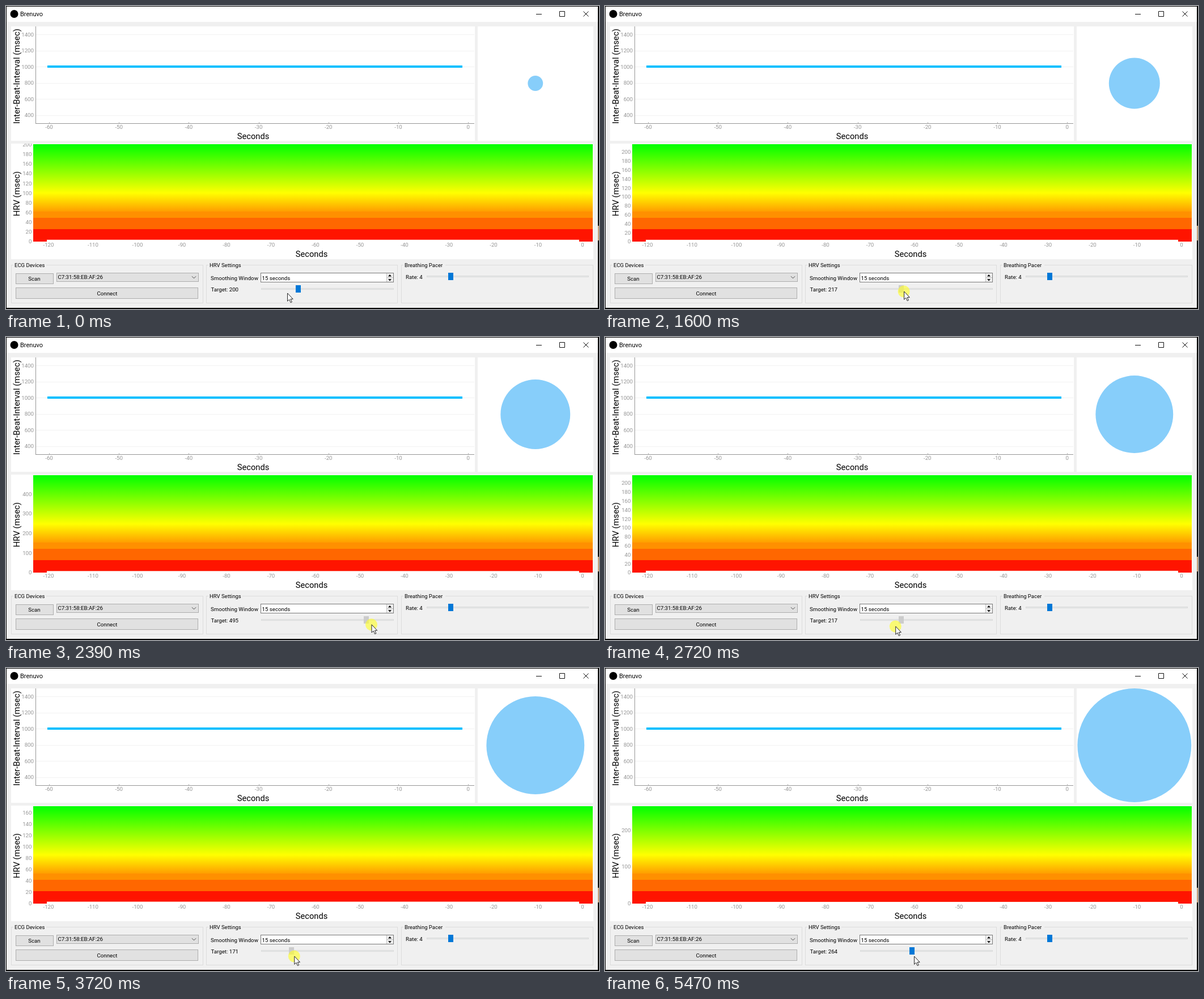
These frames come from a looping animation (1046x535 px, 5500 ms). An HTML page:

```html
<!DOCTYPE html>
<html lang="en">
<head>
<meta charset="utf-8">
<title>Heart rate monitor</title>
<style>
  html, body { margin: 0; width: 100%; height: 100%; overflow: hidden; background: #000; }
  svg { display: block; width: 1046px; height: 535px; font-family: Roboto, "Noto Sans", sans-serif; font-size: 9.7px; }
  rect, line { shape-rendering: crispEdges; }
</style>
</head>
<body>
<svg id="stage" viewBox="0 0 1046 535" xmlns="http://www.w3.org/2000/svg">
  <defs>
    <linearGradient id="zones" x1="0" y1="1" x2="0" y2="0">
      <stop offset="0" stop-color="#ff1400"/><stop offset=".125" stop-color="#ff1400"/>
      <stop offset=".125" stop-color="#ff6700"/><stop offset=".245" stop-color="#ff6700"/>
      <stop offset=".245" stop-color="#ff9000"/><stop offset=".308" stop-color="#ff9000"/>
      <stop offset=".308" stop-color="#ff9d00"/><stop offset=".5" stop-color="#ff0"/>
      <stop offset="1" stop-color="#0f0"/>
    </linearGradient>
    <clipPath id="hrvClip"><rect x="9" y="243" width="1027" height="204"/></clipPath>
    <clipPath id="plotClip"><rect x="48" y="244" width="987" height="172"/></clipPath>
    <clipPath id="pacerClip"><rect x="832" y="36" width="204" height="202"/></clipPath>
  </defs>
</svg>
<script>
const LOOP = 5500, PRESS = 1340, RELEASE = 5340, HOVER = 640;
const GREY = '#969696', BLUE = '#0078d7', INK = '#000';

// [time, pacer radius]
const RADIUS = [[0, 13.4], [560, 24.4], [820, 29], [1180, 36.3], [1990, 53], [2720, 68.4],
  [3140, 77.8], [3550, 84.2], [4310, 94], [4600, 96.8], [5270, 100.2], [5500, 100.5]];
// [time, HRV target]
const TARGET = [[1340, 200], [1600, 217], [1850, 264], [1990, 318], [2180, 434], [2330, 507],
  [2430, 488], [2600, 328], [2720, 218], [2850, 124], [2970, 70], [3060, 50], [3220, 50],
  [3500, 109], [3800, 193], [4100, 226], [4310, 234], [4600, 239], [4730, 239], [5000, 252], [5270, 264]];
// [time, x, y]
const POINTER = [[0, 496, 507], [240, 502, 515], [480, 513, 509], [640, 518, 505], [820, 519.5, 504],
  [1340, 519.5, 504], [1600, 527, 504], [1850, 553, 504], [1990, 576, 505], [2180, 625, 505],
  [2310, 649, 506], [2400, 644, 508], [2560, 572, 512], [2720, 512.5, 511], [2850, 477, 510],
  [2970, 459, 510], [3140, 452.5, 510], [3220, 455, 509], [3500, 484, 509], [3800, 517, 509],
  [4100, 530, 509], [4310, 533, 509], [4700, 534, 509], [5270, 545, 509]];

const stage = document.getElementById('stage');

function add(tag, attrs, parent = stage) {
  const el = document.createElementNS('http://www.w3.org/2000/svg', tag);
  for (const k in attrs) el.setAttribute(k, attrs[k]);
  parent.appendChild(el);
  return el;
}
const box = (x, y, width, height, fill, parent) => add('rect', { x, y, width, height, fill }, parent);
const framed = (x, y, width, height, fill, stroke) =>
  add('rect', { x: x + .5, y: y + .5, width: width - 1, height: height - 1, fill, stroke });
const path = (d, stroke, fill = 'none', width = 1) => add('path', { d, stroke, fill, 'stroke-width': width });

// Text whose middle line lies at y.
function label(str, x, y, { anchor = 'start', fill = INK, size = 9.7, parent = stage, turn } = {}) {
  const attrs = { x, y: y + size * .36, fill, 'text-anchor': anchor, 'font-size': size };
  if (turn) attrs.transform = `rotate(-90 ${x} ${y})`;
  const el = add('text', attrs, parent);
  el.textContent = str;
  return el;
}

function at(table, t) {
  if (t <= table[0][0]) return table[0].slice(1);
  for (let i = 1; i < table.length; i++) {
    const a = table[i - 1], b = table[i];
    if (t <= b[0]) {
      const k = (t - a[0]) / (b[0] - a[0]);
      return a.slice(1).map((v, j) => v + (b[j + 1] - v) * k);
    }
  }
  return table[table.length - 1].slice(1);
}

// Window and title bar
box(1, 1, 1043, 532, '#f0f0f0');
box(1, 1, 1043, 27, '#fff');
add('circle', { cx: 14.5, cy: 14, r: 7, fill: INK });
label('Brenuvo', 25, 14.5, { size: 11 });
path('M935 14.5H945M976.5 9.5h9v9h-9zM1018.5 9.5l9 9m0-9l-9 9', '#111');
box(1044, 388, 2, 26, '#c9a27c');

// Inter-beat-interval plot
box(9, 36, 818, 202, '#fff');
for (let v = 400; v <= 1400; v += 200) {
  const y = 107.3 - (v - 1000) * .1425;
  box(53, Math.round(y), 773, 1, '#f2f2f2');
  label(v, 49, y, { anchor: 'end', fill: GREY });
}
box(52, 36, 1, 172, GREY);
box(52, 207, 774, 1, GREY);
for (let i = 0; i < 7; i++) {
  const x = 76 + i * 123.2;
  box(Math.round(x), 205, 1, 2, '#b4b4b4');
  label(i * 10 - 60, x, 213.5, { anchor: 'middle', fill: GREY });
}
box(73, 105, 732, 4, '#00bfff');
label('Seconds', 436, 229.5, { anchor: 'middle', size: 14.7 });
label('Inter-Beat-Interval (msec)', 18.5, 124, { anchor: 'middle', size: 14.9, turn: true });

// Breathing pacer
box(832, 36, 204, 202, '#fff');
const pacerLayer = add('g', { 'clip-path': 'url(#pacerClip)' });
const pacer = add('circle', { cx: 933.8, cy: 136.5, fill: '#87cefa' }, pacerLayer);

// HRV plot
box(9, 243, 1027, 204, '#fff');
box(48, 244, 987, 172, 'url(#zones)');
const plot = add('g', { 'clip-path': 'url(#plotClip)' });
const trace = add('rect', { x: 72, width: 939, height: 4.4, fill: '#fff', style: 'shape-rendering:auto' }, plot);
const axis = add('g', { 'clip-path': 'url(#hrvClip)' });
const ticks = Array.from({ length: 13 }, () => label('', 45.5, 0, { anchor: 'end', fill: GREY, parent: axis }));
for (let i = 0; i < 13; i++)
  label(i * 10 - 120, 75 + i * 78.5, 422, { anchor: 'middle', fill: GREY });
label('Seconds', 539, 438, { anchor: 'middle', size: 14.7 });
label('HRV (msec)', 18.5, 331.5, { anchor: 'middle', size: 14.9, turn: true });

// Control groups
function group(title, x, width, gap) {
  framed(x, 457, width, 68, 'none', '#dcdcdc');
  box(x + 4, 456, gap, 3, '#f0f0f0');
  label(title, x + 6, 458, { size: 9.5 });
}
group('ECG Devices', 9, 339, 58);
group('HRV Settings', 353, 338, 60);
group('Breathing Pacer', 697, 339, 74);

framed(17, 472, 67, 19, '#e1e1e1', '#adadad');
label('Scan', 50, 482, { anchor: 'middle' });
framed(17, 497, 322, 20, '#e1e1e1', '#adadad');
label('Connect', 178.5, 507.5, { anchor: 'middle' });
framed(89, 471, 251, 16, '#e1e1e1', '#adadad');
label('C7:31:58:EB:AF:26', 91.5, 479);
path('M328 477.3l3.5 3.5 3.5-3.5', '#444');

label('Smoothing Window', 361, 480.5);
framed(449, 471, 235, 17, '#fff', '#7a7a7a');
box(671, 472, 12, 15, '#f0f0f0');
box(671, 472, 1, 15, '#c0c0c0');
box(672, 479, 11, 1, '#c0c0c0');
path('M674 477.5h6l-3-3.4zM674 482.2h6l-3 3.4z', 'none', INK);
label('15 seconds', 451.5, 480.5);

const targetText = label('', 361.5, 500.5);
label('Rate: 4', 705, 478.5);
const groove = (x, y, w) => framed(x, y, w, 3, '#e7eaea', '#dadada');
groove(450, 498, 234);
groove(742, 476, 286);
box(780, 471, 9, 13, BLUE);
const handle = box(511, 493, 9, 13, BLUE);

// Mouse pointer with click highlight
const pointer = add('g', {});
const halo = add('circle', { r: 10.5, fill: '#ffff28', 'fill-opacity': .62 }, pointer);
add('path', {
  d: 'M.5 0V14.2L3.7 11.2 6.1 16.6 8.3 15.6 6 10.4H10.2Z',
  fill: '#fff', stroke: '#222', 'stroke-width': 1
}, pointer);

function tickStep(top) {
  if (top < 103) return 10;
  return top < 226 ? 20 : 100;
}

function draw(t) {
  pacer.setAttribute('r', at(RADIUS, t)[0]);

  const target = Math.round(at(TARGET, t)[0]);
  const yOf = v => 415.8 - v / target * 171.3;
  targetText.textContent = 'Target: ' + target;
  trace.setAttribute('y', yOf(1) - 2.2);
  const step = tickStep(target);
  ticks.forEach((el, i) => {
    const v = i * step;
    el.textContent = v <= target ? v : '';
    el.setAttribute('y', yOf(Math.min(v, target)) + 3.5);
  });

  const held = t >= PRESS && t < RELEASE;
  const hover = t >= HOVER && t < PRESS;
  handle.setAttribute('x', Math.round(449.9 + (target - 50) * .4067));
  handle.setAttribute('fill', held ? '#ccc' : hover ? '#171717' : BLUE);
  halo.setAttribute('visibility', held ? 'visible' : 'hidden');
  pointer.setAttribute('transform', `translate(${at(POINTER, t)})`);
}

const start = performance.now();
function tick() {
  draw((performance.now() - start) % LOOP);
  requestAnimationFrame(tick);
}
tick();
</script>
</body>
</html>
```
